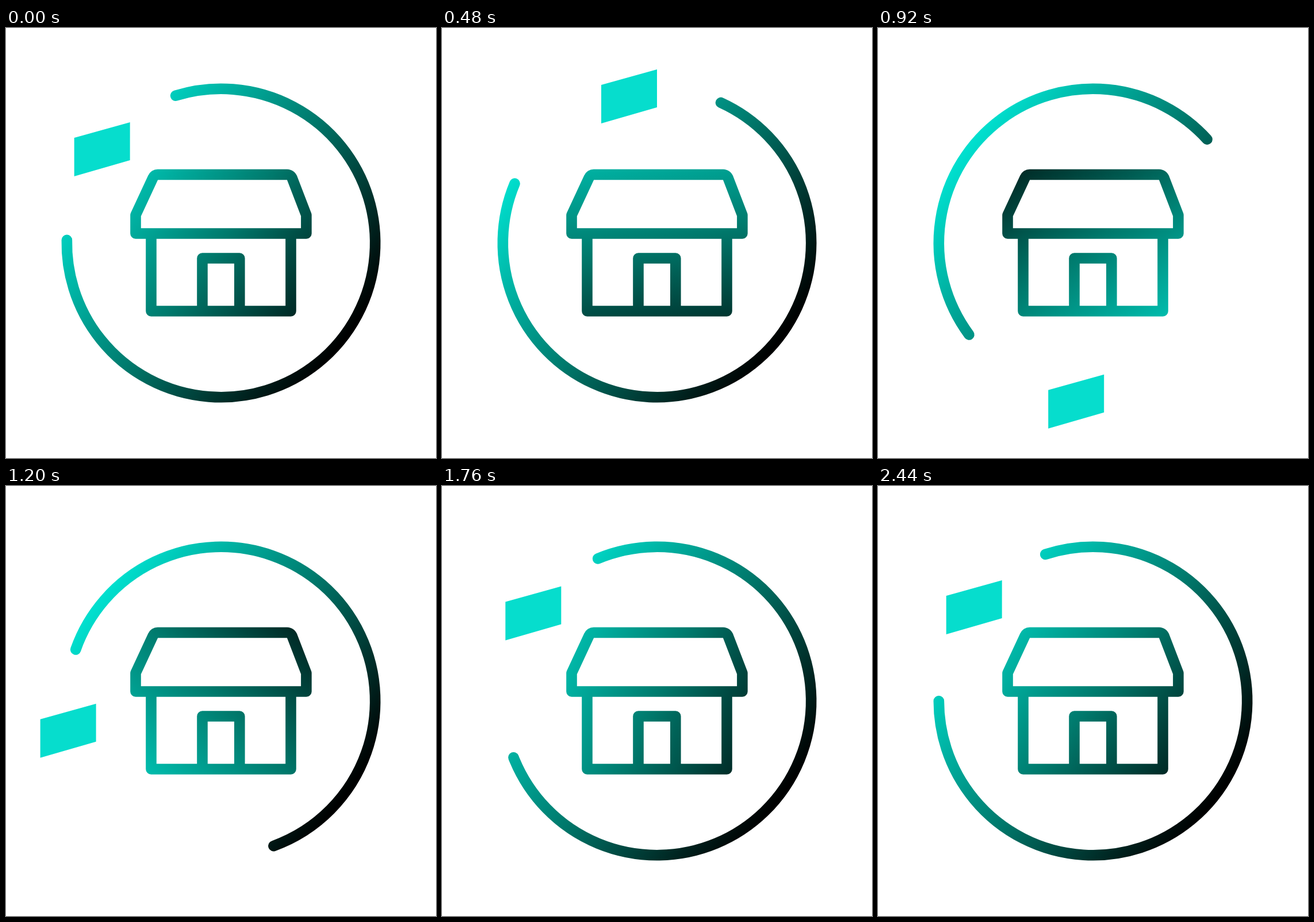
Animation of 748 by 748 pixels, one loop 2480 ms. Source, as an HTML page with a canvas:

```html
<!DOCTYPE html>
<html lang="en">
<head>
<meta charset="utf-8">
<title>Shop delivery loop</title>
<style>
  html, body { margin: 0; height: 100%; overflow: hidden; background: #fff; }
  canvas { display: block; }
</style>
</head>
<body>
<canvas id="stage" width="748" height="748"></canvas>
<script>
const ctx = document.getElementById('stage').getContext('2d');
const LOOP = 2480, STEP = 40, CENTER = 374, RADIUS = 268.2;
const rad = deg => deg * Math.PI / 180;

const house = new Path2D(
  'M225.5 357.5V325.3L255.6 260.6A9.3 9.3 0 0 1 264 255H489A9.3 9.3 0 0 1 497.7 261.2L522.4 325.3V357.5Z' +
  'M252.5 357.5V492.5H495.5V357.5M341.5 492.5V400.5H406.3V492.5');
const flag = new Path2D('M-48.5 -20L48.5 -47V19L-48.5 47Z');

const cubic = (a, b, c, d, s) => {
  const r = 1 - s;
  return r * r * r * a + 3 * r * r * s * b + 3 * r * s * s * c + s * s * s * d;
};

// Value at time t of a cubic curve given as times and values.
function curve(t, times, values) {
  if (t <= times[0]) return values[0];
  if (t >= times[3]) return values[3];
  let lo = 0, hi = 1;
  for (let i = 0; i < 30; i++) {
    const mid = (lo + hi) / 2;
    if (cubic(...times, mid) < t) lo = mid; else hi = mid;
  }
  return cubic(...values, lo);
}

const ease = (t, duration, x1, x2, turn) =>
  curve(t, [0, x1 * duration, x2 * duration, duration], [0, 0, turn, turn]);

const headTurn = t => t < 920
  ? curve(t, [0, 693, 608, 920], [0, 0, 142.1, 250.6])
  : curve(t, [920, 1070, 1560, 1977], [250.6, 303.1, 359.1, 359.1]);

function shade(deg) {
  const x = 272 * Math.cos(rad(deg)), y = 272 * Math.sin(rad(deg));
  const g = ctx.createLinearGradient(CENTER - x, CENTER - y, CENTER + x, CENTER + y);
  g.addColorStop(0, '#00dfce');
  g.addColorStop(0.5, '#00796c');
  g.addColorStop(1, '#000');
  return g;
}

function draw(t) {
  ctx.fillStyle = '#fff';
  ctx.fillRect(0, 0, 748, 748);
  ctx.lineWidth = 18.6;
  ctx.lineCap = ctx.lineJoin = 'round';

  const head = -17.1 + headTurn(t);
  const tail = 271.1 + ease(t, 2457, 0.556, 0.211, 358.9);
  ctx.strokeStyle = shade(37);
  ctx.beginPath();
  ctx.arc(CENTER, CENTER, RADIUS, rad(head - 90), rad(tail - 90));
  ctx.stroke();

  ctx.strokeStyle = shade(37 + ease(t, 2240, 0.45, 0.25, 360));
  ctx.stroke(house);

  const angle = rad(-50.1 + ease(t, 1993, 0.542, 0.199, 360));
  ctx.save();
  ctx.translate(373 + 268.3 * Math.sin(angle), 383 - 268.3 * Math.cos(angle));
  ctx.fillStyle = '#06ddcd';
  ctx.fill(flag);
  ctx.restore();
}

const start = performance.now();
function tick() {
  const t = (performance.now() - start) % LOOP;
  draw(Math.floor(t / STEP) * STEP);
  requestAnimationFrame(tick);
}
tick();
</script>
</body>
</html>
```
